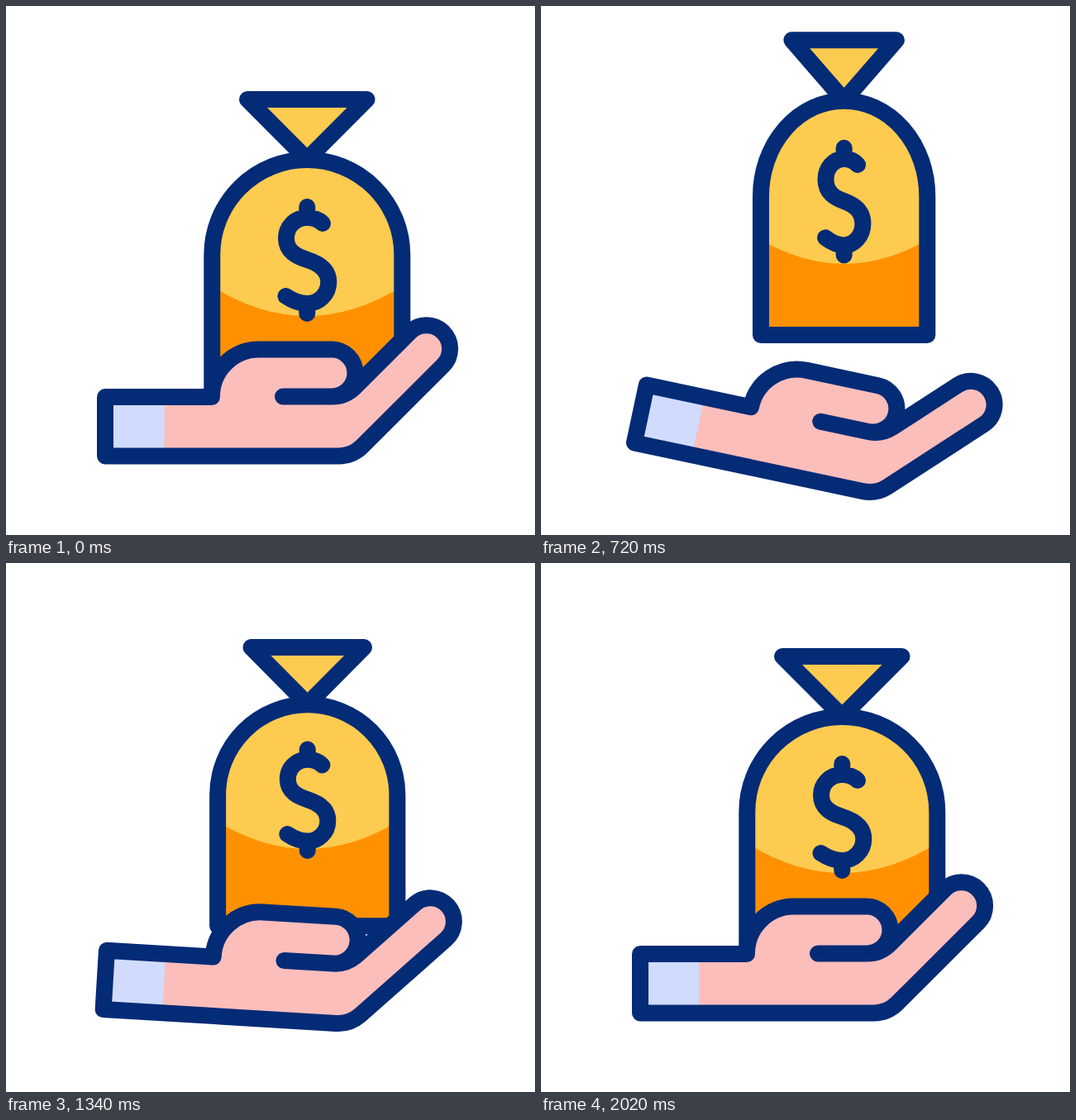
Animation, 640 px wide and 640 px high, one loop 2220 ms. Source, as an HTML page:

```html
<!DOCTYPE html>
<html lang="en">
<head>
<meta charset="utf-8">
<title>Money bag on a hand</title>
<style>
  html, body { margin: 0; width: 100%; height: 100%; overflow: hidden; background: #fff; }
  svg { display: block; width: 640px; height: 640px; }
  .ink { stroke: #042b76; stroke-width: 20; stroke-linecap: round; stroke-linejoin: round; }
  .ink, .line { vector-effect: non-scaling-stroke; }
  .line { fill: none; }
  #sparks { stroke: #91b90a; stroke-width: 21; stroke-linecap: round; }
</style>
</head>
<body>
<svg width="640" height="640">
  <g id="sparks"><line/><line/><line/><line/></g>

  <g id="bag">
    <path class="ink" fill="#fdcb50" d="M292 113H436.6L364.3 185.5Z"/>
    <path fill="#fdcb50" d="M249.3 301A115 115 0 0 1 479.3 301V468H249.3Z"/>
    <path id="shade" fill="#ff9100"/>
    <path class="ink line" d="M249.3 301A115 115 0 0 1 479.3 301V468H249.3Z"/>
    <path class="ink line" d="M383 263C378 258 371 256 364.3 256C350 256 339 267 339 281C339 297 352 303 364.3 307
      C377 311 390.3 318 390.3 334C390.3 349 378 360 364.3 360C355 360 346 356 338.5 351
      M364.3 243V256M364.3 360V372"/>
  </g>

  <g id="hand">
    <path fill="#fcbebb" d="M120 473H249A57 57 0 0 1 306 415.5H394A28 28 0 0 1 394 472.5
      A39 39 0 0 0 421.3 461.7L488.5 394.6A28 28 0 0 1 528.8 434.9L430.3 533.2A40 40 0 0 1 402 544.5H120Z"/>
    <path fill="#d0dbfd" d="M120 473H191.5V544.5H120Z"/>
    <path class="ink line" d="M120 473H249A57 57 0 0 1 306 415.5H394A28 28 0 0 1 394 472.5
      A39 39 0 0 0 421.3 461.7L488.5 394.6A28 28 0 0 1 528.8 434.9L430.3 533.2A40 40 0 0 1 402 544.5H120Z
      M394 472.5H335"/>
  </g>
</svg>
<script>
  const LOOP = 2220, STEP = 20;
  const START = 220, PEAK = 510, LAND = 1020, PEAK2 = 1200, LAND2 = 1445, END = 2010;
  const BOUNCE = 0.55, SQUASH = 0.875, STRETCH = 1.04;
  const SPARK_STARTS = [940, 1508];
  const RAYS = [
    [221, 273.5, 211, 264.5], [216, 356, 201.5, 356],
    [508, 273.5, 517, 264.5], [509.5, 356, 524, 356]
  ];

  const byId = id => document.getElementById(id);
  const bag = byId("bag"), shade = byId("shade"), hand = byId("hand"), sparks = byId("sparks");
  const clamp = x => Math.min(1, Math.max(0, x));
  const part = (t, a, b) => clamp((t - a) / (b - a));
  const mix = (a, b, k) => a + (b - a) * k;

  // Height of the toss, 0 on the palm to 1 at the top
  function lift(t) {
    if (t < PEAK) return 1 - (1 - part(t, START, PEAK)) ** 3.1;
    if (t < LAND) return 1 - part(t, PEAK, LAND) ** 2;
    if (t < PEAK2) return BOUNCE * (1 - (1 - part(t, LAND, PEAK2)) ** 2);
    return BOUNCE * (1 - part(t, PEAK2, LAND2) ** 2);
  }

  function stretch(t, h) {
    if (t < PEAK) return mix(1, STRETCH, h);
    if (t < LAND) return mix(SQUASH, STRETCH, h ** 1.3);
    if (t < LAND2) return mix(SQUASH, 1, (h / BOUNCE) ** 1.3);
    return mix(SQUASH, 1, (1 - Math.cos(Math.PI * part(t, LAND2, END))) / 2);
  }

  function drawBag(t, h) {
    const sx = 1 - 0.15 * h, sy = stretch(t, h);
    const x = 364.3 + 3.4 * h * h, y = 468 - 86 * h ** 1.1;
    bag.setAttribute("transform",
      `translate(${x} ${y}) scale(${sx} ${sy}) translate(-364.3 -468)`);

    // The shade shifts inside the bag as it stretches
    const low = 186 + (189 + 345 * (sy - 1) + 8 * h) / sy;
    const sag = (36 - 55 * (1 - sx)) / sy;
    shade.setAttribute("d",
      `M249.3 ${low - sag}Q364.3 ${low + sag} 479.3 ${low - sag}V468H249.3Z`);
  }

  function drawSparks(t) {
    const start = SPARK_STARTS.find(s => t > s && t < s + 180);
    sparks.setAttribute("visibility", start ? "visible" : "hidden");
    if (!start) return;
    const head = clamp((t - start) / 80), tail = clamp((t - start - 80) / 100);
    RAYS.forEach(([x1, y1, x2, y2], i) => {
      const ray = sparks.children[i];
      ray.setAttribute("x1", mix(x1, x2, tail));
      ray.setAttribute("y1", mix(y1, y2, tail));
      ray.setAttribute("x2", mix(x1, x2, head));
      ray.setAttribute("y2", mix(y1, y2, head));
    });
  }

  function draw(t) {
    const h = lift(t);
    drawBag(t, h);
    hand.setAttribute("transform", `rotate(${16 * h ** 1.55} 193 503)`);
    drawSparks(t);
  }

  const origin = performance.now();
  function tick() {
    const t = (performance.now() - origin) % LOOP;
    draw(Math.floor(t / STEP) * STEP);
    requestAnimationFrame(tick);
  }
  tick();
</script>
</body>
</html>
```
